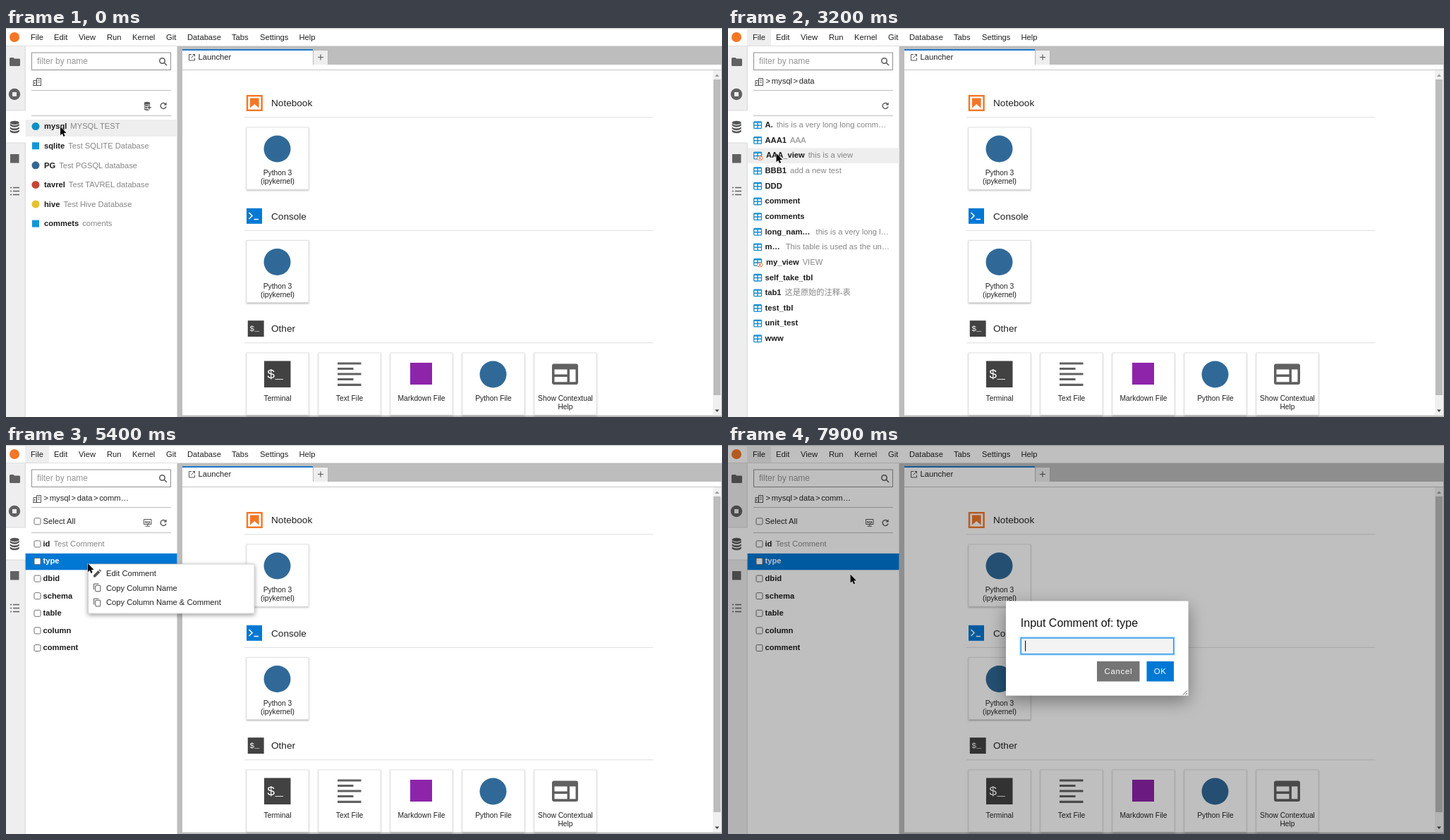
Recreate the animation shown at these times as an HTML page. Size 1015 by 552 pixels, loop 8000 ms.

```html
<!DOCTYPE html>
<html lang="en">
<head>
<meta charset="utf-8">
<title>Database browser</title>
<style>
html, body { margin: 0; width: 100%; height: 100%; overflow: hidden; background: #bdbdbd; }
svg { display: block; width: 100vw; height: 100vh; }
text { font: 11.2px 'Liberation Sans', Arial, 'Noto Sans CJK SC', 'Noto Sans CJK', sans-serif; fill: #212121; white-space: pre; }
.row { font-weight: bold; fill: #1c1c1c; }
.row .note { font-weight: normal; fill: #868686; }
.picked { fill: #fff; }
.head { font-size: 13.6px; }
.label { font-size: 10.3px; text-anchor: middle; }
.hint { font-size: 12px; fill: #969696; }
.title { font-size: 16px; fill: #111; }
.button { font-size: 11.4px; letter-spacing: .7px; fill: #fff; }
.mono { font-family: 'Liberation Mono', 'DejaVu Sans Mono', monospace; fill: #fff; }
.line { fill: none; stroke: #555; }
</style>
</head>
<body>
<svg viewBox="0 0 1015 552">
<defs>
  <filter id="cardShade" x="-10%" y="-10%" width="120%" height="125%"><feDropShadow dx="0" dy="1.2" stdDeviation="1" flood-opacity=".3"/></filter>
  <filter id="menuShade" x="-20%" y="-40%" width="140%" height="190%"><feDropShadow dx="0" dy="2" stdDeviation="3" flood-opacity=".4"/></filter>
  <filter id="boxShade" x="-30%" y="-40%" width="160%" height="200%"><feDropShadow dx="0" dy="8" stdDeviation="12" flood-opacity=".38"/></filter>
  <g id="disk" fill="#555">
    <ellipse cx="6" cy="2.4" rx="5.6" ry="2.1"/>
    <path id="layer" d="M.4 3.6Q6 7 11.6 3.6V5.6Q6 9 .4 5.6Z"/>
    <use href="#layer" y="3.4"/><use href="#layer" y="6.6"/>
  </g>
  <g id="table">
    <rect x=".7" y="1.6" width="10.8" height="9.6" rx="1" fill="#fff" stroke="#1890d2" stroke-width="1.3"/>
    <path d="M.7 2.6H11.5M.7 6.8H11.5M6 3V11" stroke="#1890d2" stroke-width="1.5"/>
  </g>
  <g id="view">
    <use href="#table"/>
    <ellipse cx="9.2" cy="10" rx="4" ry="2.8" fill="#fff" stroke="#ee7a45"/>
    <circle cx="9.2" cy="10" r="1.3" fill="#ee7a45"/>
  </g>
  <rect id="check" x="4" y="1.8" width="9" height="9" rx="1.5" fill="#fff" stroke="#6f6f6f"/>
  <g id="copy" class="line"><path d="M.6 9V.6H7.5"/><rect x="2.8" y="2.8" width="7" height="8.6" rx=".8"/></g>
</defs>

<!-- menu bar and side strip -->
<rect width="1015" height="552" fill="#bdbdbd"/>
<rect width="1015" height="25.5" fill="#fff"/>
<rect width="1015" height="1.5" fill="#d6d6d6"/>
<rect id="fileHover" x="27" y="2" width="34" height="23" fill="#eee"/>
<circle cx="12" cy="13" r="7" fill="#f37726"/>
<g id="menuBar"></g>
<rect y="26" width="27" height="526" fill="#eee"/>
<rect y="117" width="28" height="46" fill="#fff"/>
<path d="M27.3 26V117H0M0 163H27.3V552" fill="none" stroke="#d2d2d2" stroke-width=".8"/>
<g fill="#616161">
  <path d="M5 43.5Q5 42 6.5 42H10.5L12 43.6H18.5Q20 43.6 20 45V52.5Q20 54 18.5 54H6.5Q5 54 5 52.5Z"/>
  <circle cx="12" cy="94" r="8.2"/><rect x="9" y="91" width="6" height="6" fill="#eee"/>
  <use href="#disk" transform="translate(5.2 131.3) scale(1.17 1.3)"/>
  <rect x="6" y="179" width="12.5" height="12.5"/>
  <path d="M6 226.5H8M10 226.5H19M6 231.5H8M10 231.5H19M6 236.5H8M10 236.5H19" stroke="#616161" stroke-width="1.6"/>
</g>

<!-- database panel -->
<rect x="27.6" y="26" width="214.9" height="526" fill="#fff"/>
<rect x="36.5" y="35" width="197" height="24.5" fill="#fff" stroke="#8e8e8e"/>
<text x="44" y="51.4" class="hint">filter by name</text>
<g fill="none" stroke="#555" stroke-width="1.5"><circle cx="221.5" cy="46.5" r="3.7"/><path d="M224.3 49.3L228 53"/></g>
<path class="line" d="M38 81.5H50M39 81V74.5H43V81M43.5 81V71.5H49.5V81M45 74H48M45 77H48M40.5 77V79"/>
<path d="M36 88.5H234M36 124.5H234" stroke="#bdbdbd"/>
<path class="line" stroke-width="1.4" d="M226.3 108A4 4 0 1 0 227 111.5"/><path d="M227.6 105.5V109.6H223.5Z" fill="#555"/>
<rect id="hover" x="27.6" width="214.9" fill="#eee"/>
<g id="views"></g>

<!-- launcher -->
<rect x="250" y="30.5" width="185" height="22" fill="#fff"/>
<rect x="250" y="30" width="185" height="2" fill="#1b78c8"/>
<rect x="435.5" y="31.5" width="21" height="21" fill="#eee" stroke="#b0b0b0" stroke-width=".8"/>
<path d="M442 41.5H450M446 37.5V45.5" stroke="#555" stroke-width="1.1"/>
<path class="line" d="M263 37.5H259.5V46H267.5V42.5M264.5 37.5H267.5V40.5M267.5 37.5L262.5 42.5"/>
<text x="272.5" y="45">Launcher</text>
<rect x="250" y="52" width="764" height="497.5" fill="#fff"/>
<path d="M250 59.5H1014" stroke="#c4c4c4"/>
<rect x="1002" y="60" width="12" height="489.5" fill="#f0f0f0"/>
<rect x="1003" y="73" width="10" height="448" fill="#bcbcbc"/>
<path d="M1005 69L1008 65.5 1011 69Z" fill="#999"/><path d="M1005 541.5L1008 545 1011 541.5Z" fill="#444"/>
<g id="launcher"></g>
<rect x="342" y="96.2" width="20.6" height="20.6" fill="#fff" stroke="#f37726" stroke-width="2.4"/>
<path d="M346 99.5H358.6V113.5L352.3 108 346 113.5Z" fill="#f37726"/>
<rect x="341" y="255.8" width="22" height="22" fill="#0078d4"/>
<path d="M344.5 262L349 266.5 344.5 271M351.5 271.5H358" fill="none" stroke="#fff" stroke-width="1.6"/>
<g id="shell"><rect x="366" y="472.5" width="37.5" height="37.5" fill="#424242"/><text x="370" y="497" class="mono" style="font-size:19px">$_</text></g>
<use href="#shell" transform="translate(119.5 130) scale(.61)" y="-5"/>
<path d="M470 476H503.5M470 483.5H492.5M470 491H503.5M470 498.5H492.5M470 506.3H503.5" stroke="#616161" stroke-width="3.2"/>
<rect x="573" y="475" width="31" height="31" fill="#8e24aa"/>
<rect x="774" y="476.5" width="37" height="29.5" rx="3" fill="#616161"/>
<path d="M777.5 484.5H795.5V491.5H777.5ZM777.5 495H795.5V502.3H777.5ZM799 484.5H807.5V502.3H799Z" fill="#fff"/>

<g id="menu">
  <rect x="116.5" y="169" width="235.5" height="70" fill="#fff" stroke="#c6c6c6" stroke-width=".8" filter="url(#menuShade)"/>
  <rect id="menuHover" x="117" width="234.5" height="20.8" fill="#eee"/>
  <path d="M124 187.5V184.8L130.7 178 133.4 180.7 126.7 187.5ZM131.4 177.3L132.6 176.2 135.2 178.8 134.1 180Z" fill="#555"/>
  <use href="#copy" x="124" y="196.4"/><use href="#copy" x="124" y="217.4"/>
  <text x="142" y="185.7">Edit Comment</text>
  <text x="142" y="206.5">Copy Column Name</text>
  <text x="142" y="227.4">Copy Column Name &amp; Comment</text>
</g>

<g id="dialog">
  <rect width="1015" height="552" fill="#000" opacity=".25"/>
  <rect x="394" y="221.5" width="258.5" height="134" fill="#fff" filter="url(#boxShade)"/>
  <text x="414.8" y="257.5" class="title">Input Comment of: type</text>
  <rect x="414" y="272.5" width="219" height="25.5" fill="none" stroke="#2196f3" stroke-opacity=".3" stroke-width="1.5"/>
  <rect x="415.3" y="273.9" width="216.4" height="22.8" fill="#f3f3f3" stroke="#2a98e8" stroke-width="1.5"/>
  <path id="caret" d="M421.6 277.5V292.5" stroke="#111" stroke-width="1.1"/>
  <rect x="523" y="307" width="60.5" height="28.5" fill="#757575"/>
  <rect x="593.5" y="307" width="38.5" height="28.5" fill="#0078d4"/>
  <text x="533.6" y="324.7" class="button">Cancel</text>
  <text x="603.8" y="324.7" class="button">OK</text>
  <path d="M645 354.5L651 348.5M648.5 354.5L651 352" stroke="#555"/>
</g>
<path id="cursor" d="M0 0V12.2L2.8 9.7 4.6 13.9 6.6 13 4.8 8.9H8.6Z" fill="#000" stroke="#fff" stroke-width=".9" paint-order="stroke"/>
</svg>

<script>
const $ = id => document.getElementById(id);
const text = (x, y, s, cls = '') => `<text x="${x}" y="${y}" class="${cls}">${s}</text>`;
const dot = color => `<circle cx="6" cy="6" r="5.5" fill="${color}"/>`;
const square = color => `<rect x="1" y="1" width="10" height="10" fill="${color}"/>`;
const use = id => `<use href="#${id}"/>`;

const menus = { File: 35, Edit: 68, View: 103, Run: 143, Kernel: 179, Git: 227, Database: 257, Tabs: 320, Settings: 360, Help: 415.5 };
$('menuBar').innerHTML = Object.entries(menus).map(([name, x]) => text(x, 17, name)).join('');

// Launcher sections: title, top of the cards, card labels
const sections = [
  ['Notebook', 141, ['Python 3|(ipykernel)']],
  ['Console', 301.5, ['Python 3|(ipykernel)']],
  ['Other', 461, ['Terminal', 'Text File', 'Markdown File', 'Python File', 'Show Contextual|Help']]
];
const card = (label, i, top) => {
  const x = 341 + 102 * i, mid = x + 44;
  const base = top + 68;
  const logo = label.startsWith('Python') ? `<circle cx="${mid - .5}" cy="${top + 30.5}" r="19" fill="#306998"/>` : '';
  return `<rect x="${x}" y="${top}" width="88" height="88" fill="#fff" stroke="#dcdcdc" stroke-width=".8" filter="url(#cardShade)"/>` + logo +
    label.split('|').map((s, n) => text(mid, base + 12.2 * n, s, 'label')).join('');
};
$('launcher').innerHTML = sections.map(([title, top, labels]) =>
  text(376, top - 30, title, 'head') +
  `<path d="M338 ${top - 14.2}H917.5" stroke="#dedede"/>` +
  labels.map((label, i) => card(label, i, top)).join('')).join('');

const addIcon = '<use href="#disk" transform="translate(195.5 104.5) scale(.75 .9)"/><path d="M203 109.5V116M200 112.7H206" stroke="#fff" stroke-width="3"/><path d="M203 110V115.5M200.3 112.7H205.8" stroke="#555" stroke-width="1.4"/>';
const sqlIcon = '<path class="line" d="M195.5 105.5H206V112.5H195.5ZM200.7 112.5V115M197.5 115.2H204"/><text x="196.7" y="110.9" style="font-size:4.3px;font-weight:bold">SQL</text>';
const selectAll = '<use href="#check" x="36" y="102"/>' + text(52.5, 112.2, 'Select All');

// Each view: start time, path, first row top, row pitch, row height, rows of [icon, name, note, indent]
const disk = use('disk'), table = use('table'), view = use('view'), check = use('check');
const views = [
  { at: 0, path: [], top: 130, pitch: 27.6, high: 24, base: 13.3, extra: addIcon, rows: [
    [dot('#0a8fc4'), 'mysql', 'MYSQL TEST', 54], [square('#1296db'), 'sqlite', 'Test SQLITE Database', 54],
    [dot('#336791'), 'PG', 'Test PGSQL database', 54], [dot('#c74634'), 'tavrel', 'Test TAVREL database', 54],
    [dot('#e6c22b'), 'hive', 'Test Hive Database', 54], [square('#1296db'), 'commets', 'coments', 54]] },
  { at: 1300, path: ['mysql'], top: 127, pitch: 21.65, high: 21.6, base: 14, extra: '', rows:
    ['data', 'information_sche…', 'mysql', 'performance_schema', 'schema_ttt', 'sys', 'ttt']
      .map((name, i) => [disk, name, i == 1 ? 'system ta…' : '', 54]) },
  { at: 2700, path: ['mysql', 'data'], top: 127, pitch: 21.65, high: 21.6, base: 14, extra: '', rows: [
    [table, 'A.', 'this is a very long long comm…'], [table, 'AAA1', 'AAA'], [view, 'AAA_view', 'this is a view', 54],
    [table, 'BBB1', 'add a new test'], [table, 'DDD'], [table, 'comment'], [table, 'comments'],
    [table, 'long_nam…', 'this is a very long l…'], [table, 'm…', 'This table is used as the un…'], [view, 'my_view', 'VIEW', 54],
    [table, 'self_take_tbl'], [table, 'tab1', '这是原始的注释-表'], [table, 'test_tbl'], [table, 'unit_test'], [table, 'www']] },
  { at: 4300, path: ['mysql', 'data', 'comm…'], top: 129.3, pitch: 24.6, high: 23.4, base: 14.5, extra: sqlIcon + selectAll, rows:
    ['id', 'type', 'dbid', 'schema', 'table', 'column', 'comment'].map((name, i) => [check, name, i ? '' : 'Test Comment']) }
];
const drawRow = (v, [icon, name, note = '', x = 52.5], i) => {
  const y = v.top + v.pitch * i + v.base;
  const gap = name.endsWith('…') ? 8 : 5;
  return `<g transform="translate(36 ${y - 9.7})">${icon}</g>` +
    text(x, y, `${name}<tspan class="note" dx="${gap}">${note}</tspan>`, 'row');
};
$('views').innerHTML = views.map(v => '<g>' +
  text(52, 79, v.path.map(s => `<tspan dx="1.6">&gt;</tspan><tspan dx="1.6">${s}</tspan>`).join('')) +
  v.extra + v.rows.map((row, i) => drawRow(v, row, i)).join('') + '</g>').join('');
const groups = [...$('views').children];
const typeRow = groups[3].querySelectorAll('.row')[1];

// Pointer waypoints: time, x, y
const track = [
  [0, 77, 140], [500, 77, 140], [700, 76, 141], [1500, 76, 141], [1800, 75, 180], [1900, 75, 181],
  [2000, 74.5, 160], [2200, 74, 146], [2400, 73, 140], [3000, 73, 140], [3200, 68.5, 178],
  [3700, 75.5, 266], [4000, 75.5, 266], [4100, 77, 269], [4400, 77, 269], [4900, 116, 168],
  [5500, 116, 168], [6100, 158.5, 185], [6800, 158.5, 185], [6900, 173.5, 183.5], [8000, 173.5, 183.5]
];
function pointer(t) {
  const n = track.findIndex(p => p[0] > t);
  const [t0, x0, y0] = track[n - 1], [t1, x1, y1] = track[n];
  const k = (t - t0) / (t1 - t0);
  return [x0 + (x1 - x0) * k, y0 + (y1 - y0) * k];
}
const show = (id, on) => $(id).style.display = on ? '' : 'none';

function draw(now) {
  const t = Math.floor(now % 8000 / 100) * 100;
  const [x, y] = pointer(t);
  const current = views.findLastIndex(v => t >= v.at);
  const v = views[current];
  const picked = t >= 5400;
  groups.forEach((g, i) => g.style.display = i == current ? '' : 'none');
  $('cursor').setAttribute('transform', `translate(${x} ${y})`);

  const row = picked ? 1 : Math.max(0, Math.floor((y - v.top) / v.pitch));
  $('hover').setAttribute('y', v.top + v.pitch * row);
  $('hover').setAttribute('height', v.high);
  $('hover').setAttribute('fill', picked ? '#0078d4' : '#eee');
  typeRow.classList.toggle('picked', picked);

  const item = Math.floor((y - 171.5) / 20.9);
  show('fileHover', t >= 1200);
  show('menu', picked && t < 6800);
  show('menuHover', item >= 0);
  $('menuHover').setAttribute('y', 171.5 + 20.9 * Math.max(0, item));
  show('dialog', t >= 6800);
  show('caret', t < 7400 || t >= 7900);
}
function loop() {
  draw(performance.now());
  requestAnimationFrame(loop);
}
loop();
</script>
</body>
</html>
```
